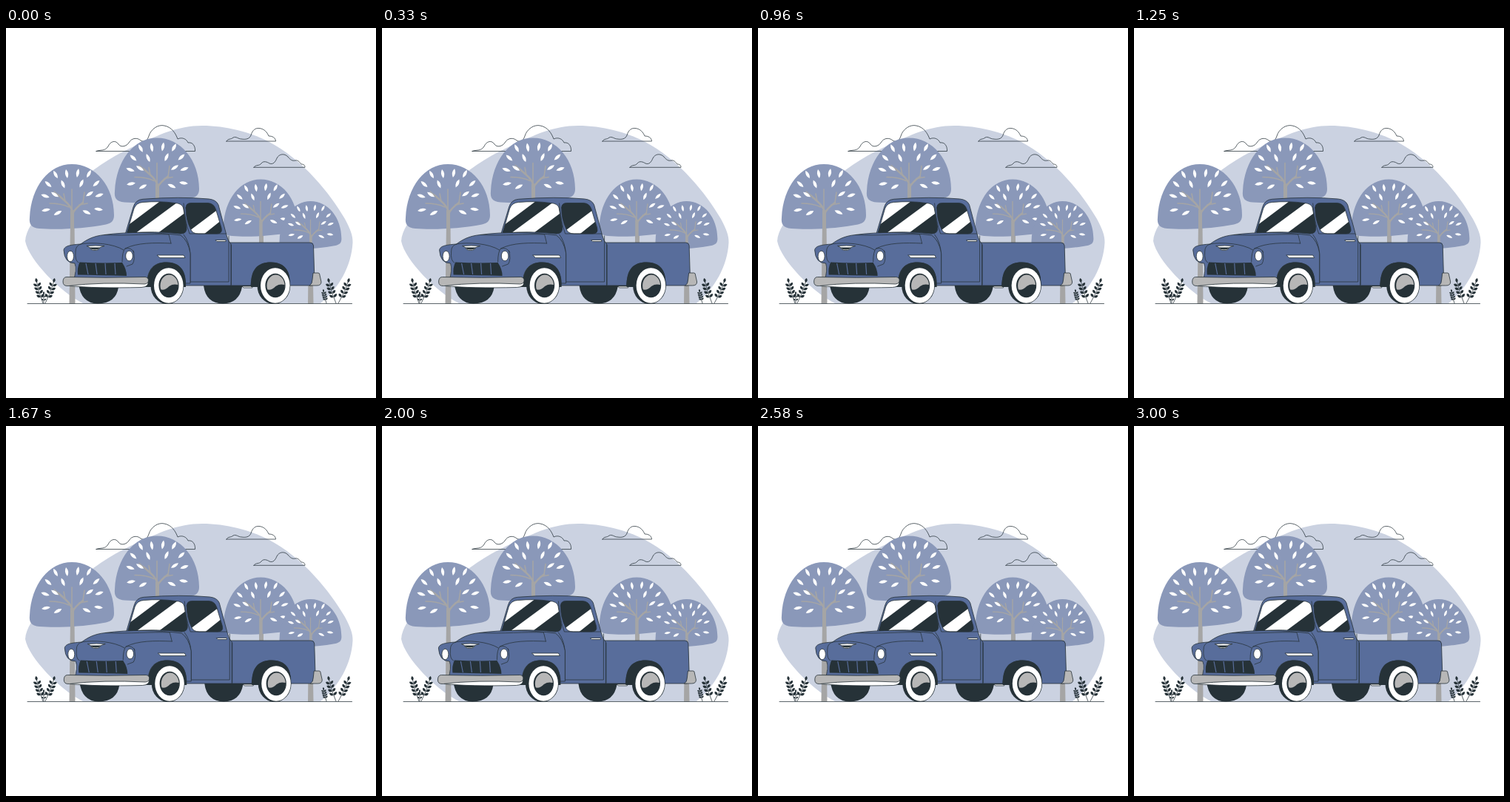
These frames come from a looping animation (500x500 px, 3040 ms). An HTML page:

```html
<!DOCTYPE html>
<html lang="en">
<head>
<meta charset="utf-8">
<title>Pickup truck</title>
<style>
  html, body { margin: 0; width: 100%; height: 100%; overflow: hidden; background: #fff; }
  svg { display: block; width: 100vw; height: 100vh; }
  .ink { fill: none; stroke: #263238; stroke-width: .75; stroke-linejoin: round; stroke-linecap: round; }
  .paint { fill: #586d9b; stroke: #263238; stroke-width: .8; stroke-linejoin: round; }
  .chrome { fill: #b7b7b7; stroke: #263238; stroke-width: .8; }
  .lamp { fill: #fff; stroke: #263238; stroke-width: .8; }
  .dark { fill: #263238; }
  .white { fill: #fff; }
</style>
</head>
<body>
<svg viewBox="0 0 500 500">
  <defs>
    <!-- tree: origin at the middle of the canopy top -->
    <g id="tree">
      <path fill="#8a98b9" d="M0 0C32 0 57 30 57 69C57 77 53 80 46 81.500C18 87-18 89-44 87C-55 86-58 81-57 72C-55 30-31 0 0 0Z"/>
      <g fill="none" stroke="#a5a5a5" stroke-linecap="round">
        <path stroke-width="5" d="M.5 88V62" stroke-linecap="butt"/>
        <path stroke-width="2.600" d="M1 64Q-2 56-9 50L-18 42M1 67Q4 60 15 52"/>
        <path stroke-width="1.600" d="M-4 58Q-14 53-30 53M0 60V34M-18 42L-24 37M15 52L17 38M-9 50L-11 40M10 55L21 53"/>
      </g>
      <g id="leaves" class="white"></g>
    </g>
    <g id="wheel">
      <ellipse class="dark" cx="-3" rx="21" ry="24.500"/>
      <ellipse class="dark" rx="20.800" ry="24.500"/>
      <ellipse class="white" cx=".3" rx="19.800" ry="23.700"/>
      <ellipse class="dark" cx=".5" rx="13.600" ry="16.200"/>
      <ellipse fill="#b7b7b7" cx="1" rx="12" ry="14.500"/>
      <path class="dark" d="M-11.500 5C-7 7-3 5 1 1C5-2 9-2 13.200-1C14 9 8 15.400 1 15.400C-6 15.400-10 11-11.500 5Z"/>
    </g>
    <clipPath id="front"><path id="frontGlass" d="M164 275L173 244Q176 236 185 235.500Q208 233.500 228 236.500Q238 237 239.500 243L244 269Q245 278 236 278Q200 274 166 277Q163 277 164 275Z"/></clipPath>
    <clipPath id="side"><path id="sideGlass" d="M243 243Q243 236.500 250 236.500H273Q281 237 283.500 245L291 270Q293 278 285 278H260Q252 278 249.500 272Q243 259 243 243Z"/></clipPath>
  </defs>

  <path fill="#cbd2e1" d="M26 288C28 259 66 230 100 206C125 186 150 169 180 157C205 145 232 132 265 132C298 132 330 141 354 153C402 178 438 224 458 258C465 271 469 281 468.500 290C467 321 450 352 425 372H104C74 357 31 314 26 288Z"/>

  <g class="ink">
    <path d="M122 166.500H255.500C256 159 252 154 246 155C244 150 238 147 232 150C229 142 224 134 214 132C206 130 196 136 193 146C191 152 187 155 182 152C178 148 170 148 166 155C163 160 155 162 152 157C148 151 141 153 138 160C134 167 127 164 122 166.500Z"/>
    <path d="M298 153H364.500C364 148 360 146 355 146C353 141 349 136 342 135.500C337 135 333 138 331 145C329 150 324 151 318 150C314 150 311 146 307 148C304 151 300 149 298 153Z"/>
    <path d="M335 188.300H404C404 186 403 184 399 184C397 182 395 178 391 179C387 180 384 178 381 174C376 169 369 170 366 176C364 181 361 185 356 183C353 181 348 179 345 183C342 187 338 184 335 188.300Z"/>
  </g>

  <path fill="#a5a5a5" d="M87 262H92.500L93.500 372.500H85.500ZM202 228H208V300H202ZM342 275H348V310H342ZM409 292H414L415.500 372.500H408Z"/>
  <use href="#tree" x="89" y="184"/>
  <use href="#tree" x="204" y="148.500"/>
  <use href="#tree" transform="translate(344 204.500) scale(.88)"/>
  <use href="#tree" transform="translate(411.500 234) scale(.735)"/>

  <g id="sprigs"></g>
  <path class="ink" d="M29 372.500H467.500"/>

  <g id="truck">
    <!-- underside and far wheels -->
    <path class="dark" d="M98 345H200V350H152Q149 372 124 372.500Q101 372 98 345Z"/>
    <path class="dark" d="M236 342H345V350H319Q315 372 293 372.500Q270 372 267 348H236Z"/>
    <path class="lamp" d="M319 349H333V351H321Z"/>

    <!-- bed -->
    <path class="paint" d="M299 290H411Q415 290 415.500 294L417 343Q417 348 412 348H383C384 326 375 317 357 317C340 317 332 329 331 348H299Z"/>
    <path class="dark" d="M331 350C330 326 340 316.500 358 316.500C376 316.500 386 328 383 350Z"/>
    <path class="chrome" d="M415 331H422Q424 331 424 334L426 343Q426 348 420 348H410Q414 346 414 340Z"/>

    <!-- cab -->
    <path class="paint" d="M161 279L172 242Q175 232 185 231.300Q235 227.500 274 231Q284 232 287 239L298 280Q300 288 304 292V348H238V284Z"/>
    <use href="#frontGlass" class="dark"/>
    <g clip-path="url(#front)" class="white">
      <path d="M158 271L176 232H211L167 265Z"/>
      <path d="M174 278L231 236L243 238V249L204 278Z"/>
    </g>
    <use href="#frontGlass" class="ink"/>
    <use href="#sideGlass" class="dark"/>
    <path clip-path="url(#side)" class="white" d="M248 274L284 247L292 259L267 279H252Z"/>
    <use href="#sideGlass" class="ink"/>
    <path class="ink" d="M240 237Q242 262 248 278H297M240 279Q248 289 249 306V343H301V281M304.500 293V347"/>
    <path class="lamp" d="M283 286.500H297V288.500H285Z"/>

    <!-- hood, fender, nose -->
    <path class="paint" d="M78 300C79 295 85 293 101 292C109 286 118 281 133 279.500C165 275 205 276 236 280Q246 287 249 304V345H242C242 326 234 317 216 317C200 317 192 326 191 342H91Q96 327 93 318Q79 318 78 300Z"/>
    <path class="dark" d="M190 350C190 326 200 316.500 217 316.500C235 316.500 244 328 243 350Z"/>
    <path class="ink" d="M101 292Q94 294 94 302Q93 315 98 317M133 279.500C165 281 195 278 220 279L223 291M223 291C200 290 177 290 161 298Q157 302 157 316M101 292C116 289 145 291 159 300M172 301Q175 313 171 319L163 322M161 298Q169 296 173 303"/>
    <path class="lamp" d="M109 294.500Q121 293.500 133 294.500L127 296.500Q126 300.500 120 300.500Q114 300.500 113 296.500Z"/>
    <path class="dark" d="M113 296.500H127Q126 299.500 120 299.500Q114 299.500 113 296.500Z"/>
    <path class="dark" d="M99.500 316.500Q128 318 157 317Q163 326 163 335Q128 334 97 333.500Q96 324 99.500 316.500Z"/>
    <path fill="none" stroke="#586d9b" stroke-width="1.200" d="M108 318L111 333M121 318L123 333M134 318L135 333M147 318L148 333"/>
    <ellipse class="lamp" cx="87" cy="308.500" rx="4.500" ry="7.300"/>
    <ellipse class="lamp" cx="166.500" cy="308" rx="4.800" ry="6.800"/>
    <path class="lamp" d="M204 307H240L242 310.500H208Z"/>

    <!-- bumper -->
    <path class="lamp" d="M82 345L192 343Q193 350 183 350.500Q120 352 86 348.500Z"/>
    <path class="chrome" d="M77 343Q77 336.500 82 336.500Q135 338 188 336.500Q192.500 337 192.500 341Q192.500 345.500 187 346Q130 343 84 348.500Q77 349 77 343Z"/>

    <use href="#wheel" x="219.500" y="348"/>
    <use href="#wheel" x="363.500" y="348"/>
  </g>
</svg>
<script>
const $ = id => document.getElementById(id);

// Almond leaf centred on x, y with its long axis along the angle.
const leaf = (x, y, angle, l, w) =>
  `<path transform="translate(${x} ${y}) rotate(${angle})" d="M${-l} 0Q0 ${-w} ${l} 0Q0 ${w} ${-l} 0Z"/>`;
const degrees = (dx, dy) => Math.atan2(dy, dx) * 180 / Math.PI;

// Canopy leaves fan out from the fork; only the left half is listed.
const half = [[-7, 13], [-22, 14], [-32, 27], [-12, 27], [-23, 41], [-36, 43], [-35, 62], [-19, 66]];
$('leaves').innerHTML = half.flatMap(([x, y]) => [[x, y], [1 - x, y - 1]])
  .map(([x, y]) => leaf(x, y, degrees(x, y - 56), 6, 4.2)).join('');

// Stem bending from upright-outward at x0, y0 to its tip, with paired leaves.
function sprig(x0, y0, x1, y1, pairs, size) {
  const cx = x0 + (x1 - x0) * .7, cy = (y0 + y1) / 2;
  const along = (a, b, c, k) => a * (1 - k) ** 2 + 2 * b * k * (1 - k) + c * k * k;
  const tilt = degrees(x1 - cx, y1 - cy);
  let out = `<path class="ink" d="M${x0} ${y0}Q${cx} ${cy} ${x1} ${y1}"/>` + leaf(x1, y1, tilt, size, size * 1.1);
  for (let i = 0; i < pairs; i++) {
    const k = .25 + .65 * i / pairs;
    for (const side of [-1, 1]) {
      const a = tilt + side * 50, r = a * Math.PI / 180, d = size * 1.15;
      out += leaf(along(x0, cx, x1, k) + Math.cos(r) * d, along(y0, cy, y1, k) + Math.sin(r) * d, a, size, size * 1.1);
    }
  }
  return `<g class="dark">${out}</g>`;
}
$('sprigs').innerHTML = [
  [50, 372, 41, 341, 4, 3.1], [53, 372, 65, 341, 4, 3.1], [51, 372, 51, 358, 2, 2],
  [446, 372, 436, 341, 4, 3.1], [449, 372, 463, 341, 4, 3.1], [433, 372, 429, 355, 4, 2]
].map(s => sprig(...s)).join('');

// Standard CSS "ease" curve, solved by bisection.
const bezier = (a, b, s) => 3 * a * s * (1 - s) ** 2 + 3 * b * s * s * (1 - s) + s ** 3;
function ease(p) {
  let lo = 0, hi = 1;
  for (let i = 0; i < 20; i++) {
    const mid = (lo + hi) / 2;
    bezier(.25, .25, mid) < p ? lo = mid : hi = mid;
  }
  return bezier(.1, 1, lo);
}

const LOOP = 3040, STEP = LOOP / 73, REACH = .55;
const shake = [0, -1, 2, -4, 4, -4, 4, -4, 2, -1, 0];

function draw(now) {
  const t = Math.floor((now % LOOP + 5) / STEP) * STEP;
  const p = Math.min(t / LOOP * 10, 9.999), i = Math.floor(p);
  const x = shake[i] + (shake[i + 1] - shake[i]) * ease(p - i);
  $('truck').setAttribute('transform', `translate(${(x * REACH).toFixed(3)} 0)`);
  requestAnimationFrame(draw);
}
draw(0);
</script>
</body>
</html>
```
